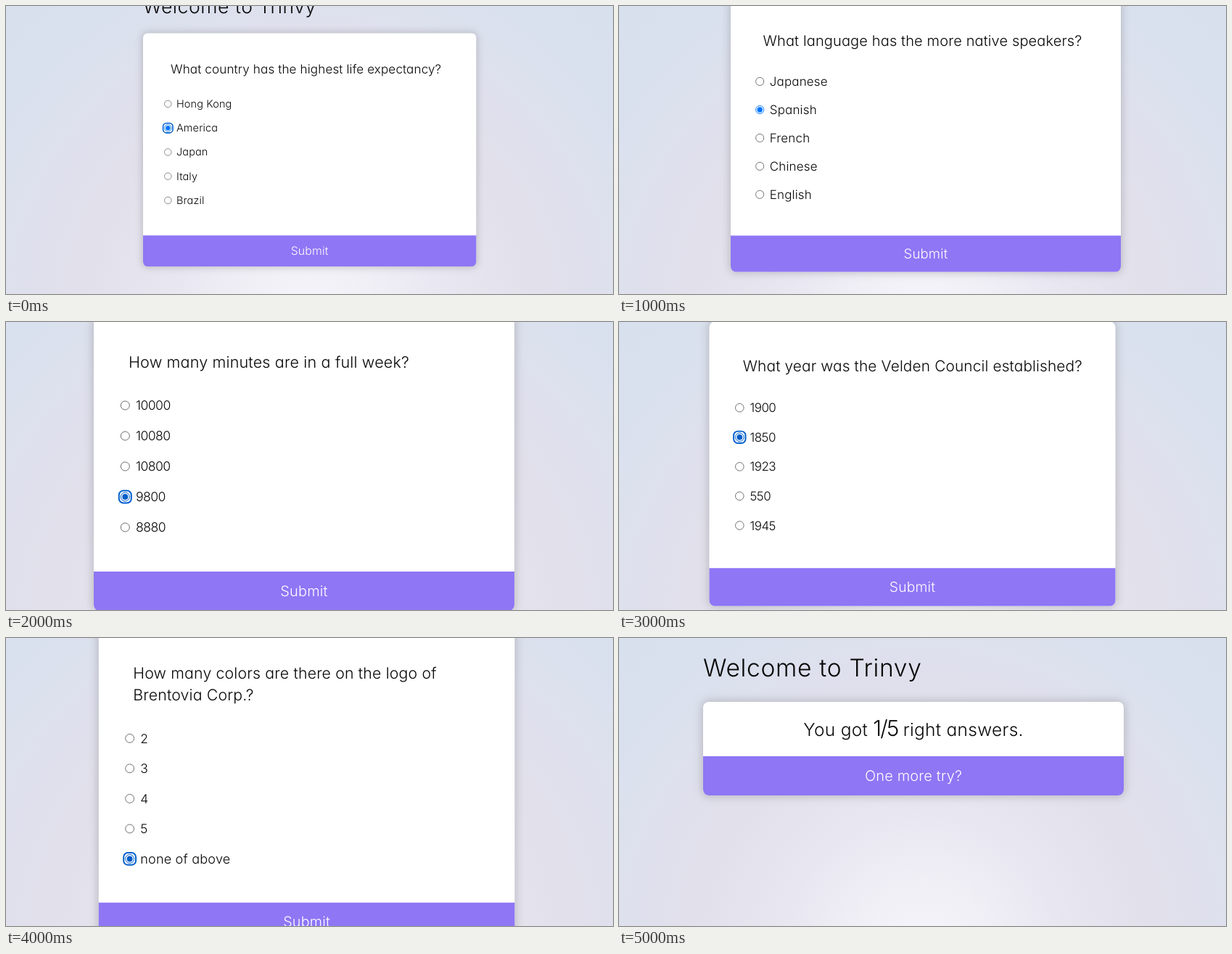
These frames come from a looping animation (837 px wide and 397 px high, 6 s). An HTML page:

```html
<!DOCTYPE html>
<html lang="en">
<head>
<meta charset="utf-8">
<title>Quiz</title>
<style>
  html, body { margin: 0; width: 100%; height: 100%; overflow: hidden; }
  .scene {
    position: absolute; left: 0; top: 0; width: 837px; height: 397px; overflow: hidden;
    background: radial-gradient(circle var(--spread) at 50% 430px,
      #f6f5fb, #f0eff6 15%, #e8e6f0 31%, #e2e0eb 50%, #dee0ed 66%, #dae1ee 80%, #d7e0ee);
  }
  text {
    font: 300 18.3px Inter, "Open Sans", sans-serif;
    font-feature-settings: "cv11";
    font-optical-sizing: none;
    letter-spacing: .01em;
    text-rendering: geometricPrecision;
    white-space: pre;
    fill: #080808;
  }
  .title { font-size: 33.6px; letter-spacing: .02em; }
  .question { font-size: 21.6px; letter-spacing: .006em; }
  .number { font-size: 17.6px; letter-spacing: -.03em; }
  .result { font-size: 24.5px; letter-spacing: .012em; text-anchor: middle; }
  .score { font-size: 30px; letter-spacing: -.06em; }
  .action { font-size: 20px; letter-spacing: .008em; fill: #fff; text-anchor: middle; }
  .shadow { fill: rgba(100, 100, 100, .3); filter: blur(6px); }
  .card { fill: #fff; }
  .button { fill: #8e76f5; }
  .radio { fill: #fff; stroke: #6e6e6e; }
  .ring { fill: #fff; stroke: #005fcc; stroke-width: 2; }
  .on { stroke: #0075ff; }
  .dot { fill: #0075ff; }
  .hover .on { stroke: #005cc8; }
  .hover .dot { fill: #005cc8; }
</style>
</head>
<body>
<script>
const STEP = 1000, WIDTH = 580, BUTTON = 54, LINE = 31.2, PITCH = 42;

// x, y: top left corner of the card; state: look of the picked option
const scenes = [
  { x: 189, y: 37.5, scale: .792, question: ['What country has the highest life expectancy?'],
    options: ['Hong Kong', 'America', 'Japan', 'Italy', 'Brazil'], picked: 1, state: 'focus' },
  { x: 154, y: -10.1, scale: .9276, question: ['What language has the more native speakers?'],
    options: ['Japanese', 'Spanish', 'French', 'Chinese', 'English'], picked: 1, state: 'plain' },
  { x: 121, y: -8, scale: 1, spread: 700, question: ['How many minutes are in a full week?'],
    options: ['10000', '10080', '10800', '9800', '8880'], picked: 3, state: 'focus hover' },
  { x: 124.5, y: -.5, scale: .9655, question: ['What year was the Velden Council established?'],
    options: ['1900', '1850', '1923', '550', '1945'], picked: 1, state: 'focus hover' },
  { x: 127.8, y: -14.2, scale: .989, spread: 700,
    question: ['How many colors are there on the logo of', 'Brentovia Corp.?'],
    options: ['2', '3', '4', '5', 'none of above'], picked: 4, state: 'focus hover' },
  { x: 116, y: 88, scale: 1, score: '1/5' }
];

const text = (kind, x, y, content) => `<text class="${kind}" x="${x}" y="${y}">${content}</text>`;

function radio(y, state) {
  const ring = state.includes('focus')
    ? '<rect class="ring" x="-8.5" y="-8.5" width="17" height="17" rx="6"/>' : '';
  const dot = state ? '<circle class="dot" r="4"/>' : '';
  return `<g class="${state}" transform="translate(43.3 ${y})">${ring}
    <circle class="radio ${state && 'on'}" r="6"/>${dot}</g>`;
}

function quiz({ question, options, picked, state }) {
  const first = 123 + (question.length - 1) * LINE;
  const lines = question.map((line, i) => text('question', 48, 70.5 + i * LINE, line));
  const rows = options.map((label, i) => {
    const y = first + i * PITCH;
    return radio(y, i === picked ? state : '') +
      text(/^\d/.test(label) ? 'number' : 'label', 58, y + 6.3, label);
  });
  return lines.concat(rows).join('');
}

const result = score =>
  text('result', WIDTH / 2, 47, `You got <tspan class="score">${score}</tspan> right answers.`);

function card(scene) {
  const cut = scene.score ? 75 : 352 + (scene.question.length - 1) * LINE;
  const height = cut + BUTTON;
  return `<g transform="translate(${scene.x} ${scene.y}) scale(${scene.scale})">
    ${text('title', 0, -35, 'Welcome to Trinvy')}
    <rect class="shadow" x="-2" y="-2" width="${WIDTH + 4}" height="${height + 4}" rx="10"/>
    <rect class="card" width="${WIDTH}" height="${height}" rx="8"/>
    <path class="button" d="M0 ${cut}H${WIDTH}V${height - 8}a8 8 0 0 1-8 8H8a8 8 0 0 1-8-8z"/>
    ${scene.score ? result(scene.score) : quiz(scene)}
    ${text('action', WIDTH / 2, cut + 33.8, scene.score ? 'One more try?' : 'Submit')}
  </g>`;
}

document.body.innerHTML = scenes.map(scene =>
  `<svg class="scene" style="--spread:${scene.spread || 620}px">${card(scene)}</svg>`).join('');

const duration = STEP * scenes.length;
document.querySelectorAll('.scene').forEach((element, i) => element.animate([
  { opacity: 1, easing: 'step-end' },
  { opacity: 0, offset: 1 / scenes.length },
  { opacity: 0 }
], { duration, delay: i * STEP - duration, iterations: Infinity }));
</script>
</body>
</html>
```
